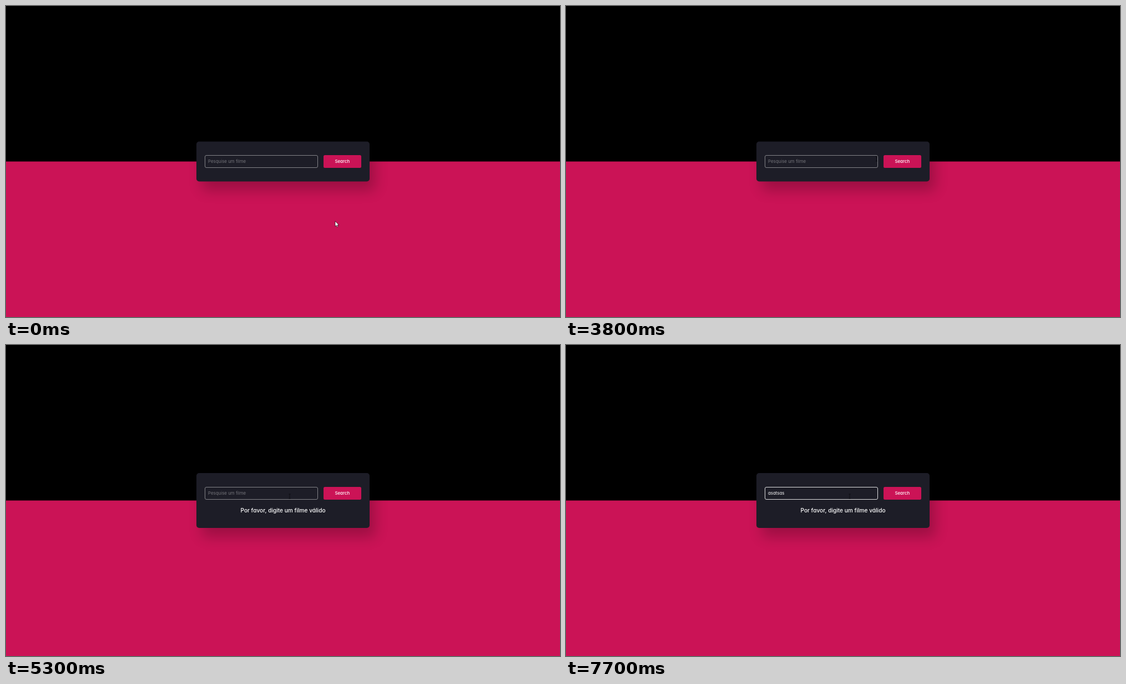
These frames come from a looping animation (998 by 561 pixels, 8 s). An HTML page:

```html
<!DOCTYPE html>
<html lang="pt">
<head>
<meta charset="utf-8">
<title>Pesquisa</title>
<style>
  html, body { margin: 0; width: 100%; height: 100%; overflow: hidden; background: #000; }
  svg { display: block; width: 100vw; height: 100vh; }
  text { font-family: Inter, "Open Sans", sans-serif; font-feature-settings: "cv11"; fill: #fff; white-space: pre; }
  .small { font-size: 7.9px; }
  .medium { font-weight: 500; }
  #cursor path { stroke-linejoin: round; stroke-linecap: round; }
</style>
</head>
<body>
<svg viewBox="0 0 998 561">
  <defs>
    <filter id="blur" x="-30%" y="-100%" width="160%" height="300%">
      <feGaussianBlur stdDeviation="12.5"/>
    </filter>
  </defs>
  <rect width="998" height="561"/>
  <rect y="280.5" width="998" height="280.5" fill="#cb1356"/>
  <rect id="shadow" x="353" width="312" rx="5" opacity=".22" filter="url(#blur)"/>
  <rect id="card" x="343" width="312" rx="5" fill="#1d1d27"/>
  <g id="row">
    <rect id="field" x="358.5" y="269.5" width="203" height="22" rx="2.5" fill="none" stroke-width=".9"/>
    <text id="entry" class="small" x="364" y="282.8"></text>
    <rect id="caret" y="275.5" width=".8" height="9.5" fill="#fff"/>
    <rect id="button" x="572" y="269" width="68" height="23" rx="2.5"/>
    <text class="small medium" x="605.8" y="282.8" text-anchor="middle">Search</text>
  </g>
  <text id="message" class="medium" x="499" y="301.5" font-size="10.15" text-anchor="middle">Por favor, digite um filme válido</text>
  <g id="cursor">
    <path id="arrow" d="M0 0V9L2.1 7.1 3.5 10.2 5 9.5 3.7 6.5H6.4Z" fill="#fff" stroke="#000" stroke-width=".6"/>
    <path id="hand" d="M-.9 .8Q0-.7 .9 .8V4L4.2 4.7Q5.6 5 5.5 6.5L4.7 10.8H-.2L-3.1 7.2Q-3.3 5.8-2 6.1L-.9 7Z" fill="#fff" stroke="#111" stroke-width=".5"/>
    <path id="beam" d="M-1.4-4H1.4M0-4V4M-1.4 4H1.4" fill="none" stroke="#07070c" stroke-width=".8" opacity=".8"/>
  </g>
</svg>
<script>
const LOOP = 8000, STEP = 100;
const ERROR_AT = 4500, FOCUS_AT = 5400, TYPE_AT = 6500, BLINK = 500;
const WORD = "asatsas", PAUSE_AFTER = 4;

// Pointer stops, joined by eased glides
const STOPS = [
  { t: 2800, x: 593, y: 388.5 },
  { t: 2900, x: 556, y: 378.5 },
  { t: 3700, x: 510, y: 278 },
  { t: 4000, x: 599, y: 274 },
  { t: 4400, x: 597, y: 273 },
  { t: 4500, x: 580, y: 261 },
  { t: 5300, x: 511, y: 273 }
];

const el = {};
document.querySelectorAll("[id]").forEach(n => el[n.id] = n);

const set = (node, attrs) => {
  for (const k in attrs) node.setAttribute(k, attrs[k]);
};
const show = (node, on) => set(node, { visibility: on ? "visible" : "hidden" });
const easeOut = k => 1 - (1 - k) ** 2;

function pointer(t) {
  const next = STOPS.findIndex(s => s.t > t);
  if (next === 0) return STOPS[0];
  if (next < 0) return STOPS.at(-1);
  const a = STOPS[next - 1], b = STOPS[next];
  const k = easeOut((t - a.t) / (b.t - a.t));
  return { x: a.x + (b.x - a.x) * k, y: a.y + (b.y - a.y) * k };
}

// One letter per step, with a one-step pause in the middle of the word
const keyTime = i => TYPE_AT + STEP * (i + (i >= PAUSE_AFTER ? 1 : 0));

function drawCard(error) {
  const height = error ? 99 : 72, y = 280.5 - height / 2;
  set(el.card, { y, height });
  set(el.shadow, { y: y + 16.5, height });
  show(el.message, error);
}

function drawPointer(t, shift) {
  const { x, y } = pointer(t);
  const over = (left, right) =>
    x > left && x < right && y > 269 + shift && y < 292 + shift;
  const overField = over(358, 562), overButton = over(572, 640);
  set(el.cursor, { transform: `translate(${x} ${y})` });
  show(el.beam, overField);
  show(el.hand, overButton);
  show(el.arrow, !overField && !overButton);
  set(el.button, { fill: overButton ? "#a8154a" : "#cb1356" });
}

function drawField(t) {
  const focused = t >= FOCUS_AT;
  const count = [...WORD].filter((c, i) => keyTime(i) <= t).length;
  set(el.field, { stroke: focused ? "#f4f4f4" : "#8f8f94" });
  el.entry.textContent = count ? WORD.slice(0, count) : "Pesquise um filme";
  el.entry.style.fill = count ? "#fff" : "#74747a";

  const idle = t - (count ? keyTime(count - 1) : FOCUS_AT);
  show(el.caret, focused && Math.floor(idle / BLINK) % 2 === 0);
  set(el.caret, { x: 364 + (count ? el.entry.getComputedTextLength() : 0) });
}

function render(t) {
  const error = t >= ERROR_AT, shift = error ? -13 : 0;
  set(el.row, { transform: `translate(0 ${shift})` });
  drawCard(error);
  drawPointer(t, shift);
  drawField(t);
}

function tick() {
  const t = performance.now() % LOOP;
  render(Math.floor(t / STEP) * STEP);
  requestAnimationFrame(tick);
}
tick();
</script>
</body>
</html>
```
